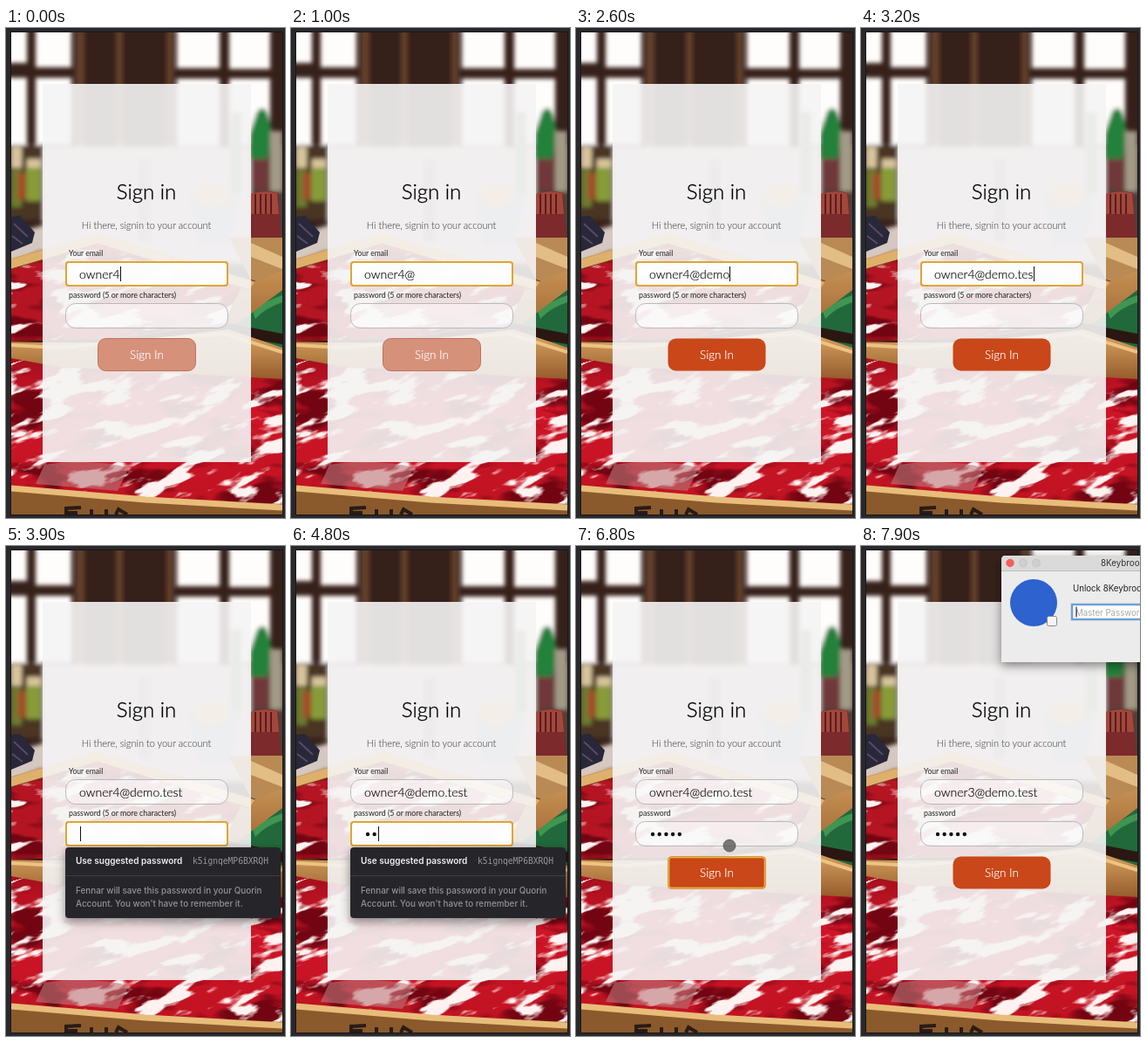
An HTML page that plays this animation: 320 px wide and 561 px high, repeating every 8000 ms.

```html
<!DOCTYPE html>
<html lang="en">
<head>
<meta charset="utf-8">
<title>Sign in</title>
<style>
html, body { margin: 0; width: 100%; height: 100%; overflow: hidden; background: #29292c }
svg { position: absolute; inset: 0; width: 100%; height: 100% }
text { font-family: Lato, sans-serif; white-space: pre }
.light { font-weight: 300 }
.ui text { font-family: Inter, sans-serif }
.ui .mono { font-family: "DejaVu Sans Mono", monospace }
.field { fill: #fff; stroke: #b9b9bd }
.ring { fill: none; stroke: #d8981c; stroke-width: 2 }
</style>
</head>
<body>
<svg viewBox="0 0 320 561" preserveAspectRatio="none">
  <defs>
    <filter id="soft" x="-10%" y="-10%" width="120%" height="120%"><feGaussianBlur stdDeviation="2.4"/></filter>
    <filter id="gloss" x="0" y="0" width="100%" height="100%" color-interpolation-filters="sRGB">
      <feTurbulence type="fractalNoise" baseFrequency=".018 .06" numOctaves="4" seed="8"/>
      <feColorMatrix values="0 0 0 0 1  0 0 0 0 .95  0 0 0 0 .94  0 0 0 10 -5.4"/>
    </filter>
    <filter id="folds" x="0" y="0" width="100%" height="100%" color-interpolation-filters="sRGB">
      <feTurbulence type="fractalNoise" baseFrequency=".015 .04" numOctaves="3" seed="3"/>
      <feColorMatrix values="0 0 0 0 .45  0 0 0 0 .02  0 0 0 0 .07  0 0 0 6 -3"/>
    </filter>
    <clipPath id="photo"><rect x="6" y="5" width="311" height="552"/></clipPath>
    <clipPath id="upper"><path d="M6 276L105 247 270 296 250 338 130 354 6 359Z"/></clipPath>
    <clipPath id="lower"><path d="M6 378L60 388 317 402V546L160 538 6 525Z"/></clipPath>
    <linearGradient id="wood" x2="0" y2="1"><stop stop-color="#dcaa66"/><stop offset="1" stop-color="#94592a"/></linearGradient>
    <linearGradient id="red" x2="0" y2="1"><stop stop-color="#a50f1d"/><stop offset=".35" stop-color="#cf1527"/><stop offset="1" stop-color="#c01322"/></linearGradient>
  </defs>

  <g clip-path="url(#photo)">
    <rect width="320" height="561" fill="#36201a"/>
    <g filter="url(#soft)">
      <path d="M0 0H24V40H0ZM34 0H75V45H34ZM0 57H24V134H0ZM34 57H75V134H34ZM196 0H245V46H196ZM196 58H245V135H196ZM256 0H303V47H256ZM256 58H303V134H256Z" fill="#fffdfb"/>
      <path d="M80 0H90V140H80ZM126 0H134V140H126ZM184 0H192V140H184Z" fill="#64402b"/>
      <path d="M0 134H42V220H0Z" fill="#493622"/>
      <path d="M42 136H281V270H42Z" fill="#cfc7c2"/>
      <path d="M281 134H320V250H281Z" fill="#514039"/>
      <path d="M6 136H18V160H6ZM24 150H40V166H24Z" fill="#d8c59d"/>
      <path d="M6 162H18V205H6Z" fill="#6d7a2f"/>
      <path d="M23 160H40V198H23Z" fill="#879b37"/>
      <path d="M14 166H22V196H14Z" fill="#a7482c"/>
      <path d="M258 96H270V190H258Z" fill="#80a07d"/>
      <path d="M279 122L288 96Q296 86 301 100L306 122 300 150H279Z" fill="#24813a"/>
      <path d="M303 118H317V187H303Z" fill="#a39a86"/>
      <path d="M282 150H302V185H282Z" fill="#71383a"/>
      <path d="M210 190H268L257 248H220Z" fill="#a6b9cc"/>
      <ellipse cx="236" cy="192" rx="20" ry="13" fill="#e3b974"/>
      <path d="M152 150H166V245H152Z" fill="#a19da8"/>
      <path d="M0 238L42 226V255L0 272Z" fill="#d5c8c0"/>
    </g>
    <path d="M281 190Q296 184 312 189L316 242H281Z" fill="#7c2a2c"/>
    <path d="M281 190Q296 185 311 189L313 213H281Z" fill="#a2473a"/>
    <path d="M286 190V213M292 190V213M298 190V213M304 190V213" stroke="#571c20" stroke-width="2"/>
    <path d="M6 216L16 215 33 234 30 246 6 256Z" fill="#28283a"/>
    <path d="M9 224L25 239M7 238L19 247" stroke="#5b4963" stroke-width="2"/>

    <path d="M255 240H317V300L281 288Z" fill="#b98a54"/>
    <path d="M281 246L317 262V276L281 262Z" fill="#e2bd85"/>
    <path d="M255 350L285 307 317 284V370H255Z" fill="#21693a"/>
    <path d="M283 325Q297 312 317 306V314Q298 320 286 333Z" fill="#3f9551"/>

    <path d="M6 264L106 235 285 290 317 278V300L258 344 6 370Z" fill="url(#wood)"/>
    <path d="M6 276L105 247 270 296 250 338 130 354 6 359Z" fill="#b51522"/>
    <g clip-path="url(#upper)">
      <rect y="230" width="320" height="140" filter="url(#folds)"/>
      <rect x="-40" y="190" width="420" height="230" filter="url(#gloss)" transform="rotate(-14 160 300)"/>
    </g>
    <path d="M6 265L106 236 285 291 279 300 105 247 6 276Z" fill="#dfb06b"/>
    <path d="M6 276L105 247 279 300" fill="none" stroke="#6b3619"/>

    <path d="M6 359L130 355 255 338 317 350V362L255 352 130 362Z" fill="#2b1712"/>
    <path d="M6 360L130 360 255 345 317 366V404L60 389 6 379Z" fill="url(#wood)"/>
    <path d="M6 363L60 366 250 350 317 371" fill="none" stroke="#eec382" stroke-width="4"/>
    <path d="M6 378L60 388 317 402V546L160 538 6 525Z" fill="url(#red)"/>
    <g clip-path="url(#lower)">
      <rect y="370" width="320" height="180" filter="url(#folds)"/>
      <rect x="-60" y="340" width="440" height="260" filter="url(#gloss)" transform="rotate(-18 160 460)"/>
      <path d="M44 500Q90 492 141 503L128 530 34 522Z" fill="#b9777a" fill-opacity=".6"/>
    </g>
    <path d="M6 524L160 537 317 545V557H6Z" fill="#8b5a2c"/>
    <path d="M6 527L160 540 317 549" fill="none" stroke="#e8bd7a" stroke-width="7"/>
    <path d="M69 557V550L86 549M71 555H82M98 551V557M115 551V557M126 557L129 551 139 557" fill="none" stroke="#291b16" stroke-width="4"/>
  </g>
  <path d="M5.5 4.5H317.5V557.5H5.5Z" fill="none" stroke="#17171a"/>

  <rect x="42" y="64" width="239" height="433" fill="#f5f4f4" fill-opacity=".9"/>
  <text class="light" x="161" y="196" font-size="24" text-anchor="middle" stroke="#000" stroke-width=".3">Sign in</text>
  <text class="light" x="161" y="230" font-size="11" text-anchor="middle" fill="#555" stroke="#555" stroke-width=".1">Hi there, signin to your account</text>
  <text x="72" y="261" font-size="8.6" fill="#222">Your email</text>
</svg>

<svg viewBox="0 0 320 561" preserveAspectRatio="none">
  <defs>
    <filter id="shade" x="-20%" y="-20%" width="140%" height="150%"><feDropShadow dx="0" dy="4" stdDeviation="6" flood-opacity=".45"/></filter>
  </defs>
  <text id="label" x="72" y="309" font-size="8.8" fill="#222"></text>
  <rect id="emailBox" class="field" x="68.5" y="267.5" width="186" height="28"/>
  <rect id="passBox" class="field" x="68.5" y="315.5" width="186" height="28"/>
  <text id="email" class="light" x="84" y="287" font-size="14" stroke="#000" stroke-width=".15"></text>
  <g id="dots" fill="#111"></g>
  <path id="caret" d="M0 0V17" stroke="#111"/>
  <rect id="button" x="105.5" y="355.5" width="112" height="37"/>
  <text class="light" x="161.5" y="379" font-size="13.5" text-anchor="middle" fill="#fff" stroke="#fff" stroke-width=".2">Sign In</text>
  <g id="ring">
    <rect class="ring" rx="3"/>
    <rect class="ring" rx="3" style="stroke:#f3cf75;stroke-width:1;stroke-dasharray:1 1"/>
  </g>

  <g id="popup" class="ui">
    <rect x="68" y="345" width="247" height="81" rx="4" fill="#27282c" filter="url(#shade)"/>
    <path d="M68 377.5H315" stroke="#3d3e42"/>
    <text x="80" y="364" font-size="10" font-weight="600" fill="#f0f0f2">Use suggested password</text>
    <text class="mono" x="214" y="364" font-size="9.65" fill="#96979b">k5ignqeMP6BXRQH</text>
    <g font-size="9.9" font-weight="500" fill="#929397">
      <text x="80" y="398">Fennar will save this password in your Quorin</text>
      <text x="80" y="413">Account. You won't have to remember it.</text>
    </g>
  </g>

  <circle id="pointer" r="7" fill="#555" fill-opacity=".78" stroke="#444" stroke-opacity=".6"/>

  <g id="dialog" class="ui">
    <path d="M161 133V16Q161 11 166 11H325V133Z" fill="#ececec" filter="url(#shade)"/>
    <path d="M161 28V16Q161 11 166 11H320V28Z" fill="#dadada"/>
    <path d="M161 28.5H320" stroke="#bcbcbc"/>
    <circle cx="171" cy="19.5" r="4.7" fill="#f45f57"/>
    <g fill="#cfcfcf" stroke="#bdbdbd" stroke-width=".7"><circle cx="186" cy="19.5" r="4.5"/><circle cx="201" cy="19.5" r="4.5"/></g>
    <text x="275" y="23" font-size="9.8" fill="#333">8Keybrook</text>
    <circle cx="198" cy="65" r="27" fill="#2d62cf"/>
    <rect x="213.5" y="80.5" width="11" height="11" rx="2" fill="#f5f5f5" stroke="#888"/>
    <text x="243" y="52" font-size="9.7" fill="#222">Unlock 8Keybrook</text>
    <rect x="242" y="67" width="90" height="17" fill="#fff" stroke="#709fd3" stroke-width="2.5"/>
    <text x="246" y="80" font-size="9.7" fill="#aaa">Master Password</text>
    <path d="M247 69.5V81.5" stroke="#111"/>
  </g>
</svg>
<script>
const $ = id => document.getElementById(id);
const LOOP = 8000, TO_PASS = 3900, TO_BUTTON = 6400, NEXT = 7500;
const ADDRESS = 'owner4@demo.test';
const emailKeys = [400, 2100, 2250, 2400, 2550, 2700, 2850, 3000, 3150, 3300];
const passKeys = [4500, 4700, 4900, 5100, 5300];
const path = [[5700, 162, 262], [6000, 168, 289], [6800, 176, 343], [7100, 174, 372], [NEXT, 174, 372]];

const set = (node, attrs) => { for (const key in attrs) node.setAttribute(key, attrs[key]); };
const show = (node, on) => node.setAttribute('visibility', on ? 'visible' : 'hidden');
const upTo = (keys, t) => keys.filter(k => k <= t);

const dots = passKeys.map((_, i) => {
  const dot = document.createElementNS('http://www.w3.org/2000/svg', 'circle');
  set(dot, { cx: 88 + i * 7.7, cy: 330, r: 2.2 });
  return $('dots').appendChild(dot);
});

function placeRing(x, y, width, height) {
  for (const rect of $('ring').children) set(rect, { x, y, width, height });
}

function movePointer(t) {
  const i = path.findIndex(p => p[0] > t);
  show($('pointer'), i > 0);
  if (i < 1) return;
  const [t0, x0, y0] = path[i - 1], [t1, x1, y1] = path[i];
  const k = (t - t0) / (t1 - t0);
  set($('pointer'), { cx: x0 + (x1 - x0) * k, cy: y0 + (y1 - y0) * k });
}

function draw(t) {
  const next = t >= NEXT;
  const focus = next ? '' : t < TO_PASS ? 'email' : t < TO_BUTTON ? 'pass' : 'button';
  const typed = upTo(emailKeys, t).length;
  const count = upTo(passKeys, t).length;

  $('email').textContent = next ? ADDRESS.replace('4', '3') : ADDRESS.slice(0, 6 + typed);
  $('label').textContent = count < 5 ? 'password (5 or more characters)' : 'password';
  dots.forEach((dot, i) => show(dot, i < count));
  for (const id of ['email', 'pass'])
    set($(id + 'Box'), { rx: focus === id ? 4 : 11, 'fill-opacity': focus === id ? .9 : .45 });

  // The address becomes valid with its first letter after the @
  const ready = typed > 1;
  set($('button'), {
    fill: ready ? '#c94718' : '#d6917b', stroke: ready ? 'none' : '#bd725b',
    rx: focus === 'button' ? 4 : 9
  });

  show($('ring'), focus);
  if (focus === 'button') placeRing(106.5, 356.5, 110, 35);
  else placeRing(69, focus === 'email' ? 268 : 316, 185, 27);

  const last = Math.max(0, ...upTo([...emailKeys, TO_PASS, ...passKeys], t));
  const inEmail = focus === 'email';
  show($('caret'), (inEmail || focus === 'pass') && (t - last) % 1000 < 500);
  const x = inEmail ? 84 + $('email').getComputedTextLength() : 84.5 + count * 7.7;
  set($('caret'), { transform: `translate(${Math.round(x) + .5} ${inEmail ? 273 : 321})` });

  show($('popup'), focus === 'pass');
  show($('dialog'), next);
  movePointer(t);
}

function tick(now) {
  draw(now % LOOP);
  requestAnimationFrame(tick);
}
draw(0);
requestAnimationFrame(tick);
</script>
</body>
</html>
```
